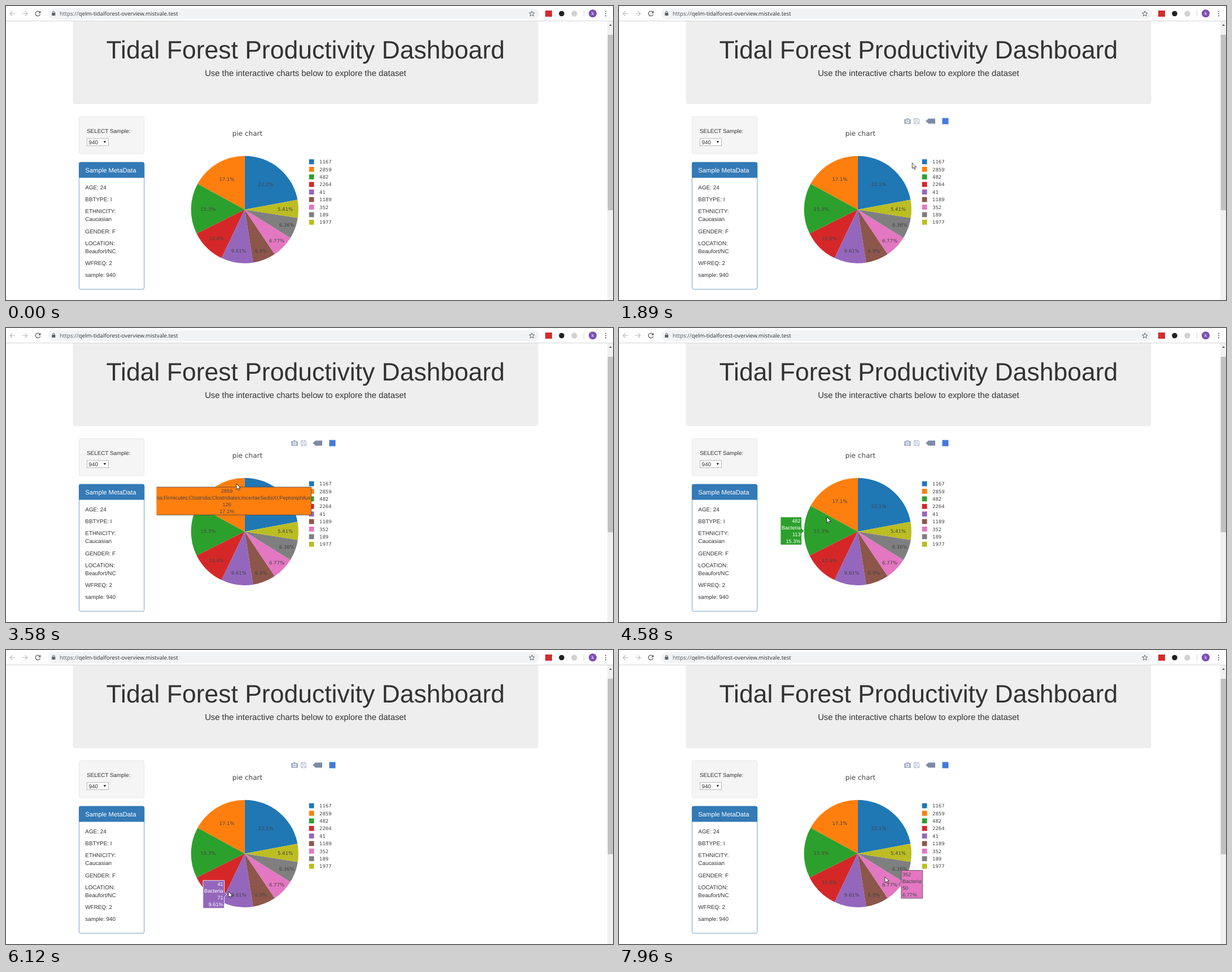
Recreate the animation shown at these times as an HTML page. Size 1075 by 521 pixels, loop 8000 ms.

```html
<!DOCTYPE html>
<html lang="en">
<head>
<meta charset="utf-8">
<title>Dashboard</title>
<style>
html, body { margin: 0; width: 100%; height: 100%; overflow: hidden; background: #fff; }
svg { display: block; width: 100%; height: 100%; }
text { font-family: "Liberation Sans", Arial, sans-serif; text-rendering: geometricPrecision; white-space: pre; }
.plot text { font-family: "DejaVu Sans", Verdana, sans-serif; font-size: 8.5px; fill: #444; }
.plot .title { font-size: 12px; }
#tip text { font-family: "Liberation Sans", Arial, sans-serif; font-size: 9.17px; }
.body text { font-size: 9.88px; fill: #333; }
.mid { text-anchor: middle; }
.end { text-anchor: end; }
</style>
</head>
<body>
<svg viewBox="0 0 1075 521" xmlns="http://www.w3.org/2000/svg">
  <defs><clipPath id="area"><rect x="266.5" y="190" width="322.5" height="320"/></clipPath></defs>
  <rect width="1075" height="521" fill="#fff"/>

  <!-- page header -->
  <rect x="118.4" y="10" width="824.1" height="164" rx="4.2" fill="#eee"/>
  <text class="mid" x="530.4" y="93.2" font-size="44.5" fill="#333">Tidal Forest Productivity Dashboard</text>
  <text class="mid" x="530.4" y="124.1" font-size="14.82" fill="#333">Use the interactive charts below to explore the dataset</text>

  <!-- browser bar -->
  <rect width="1075" height="26" fill="#fff"/>
  <path d="M0 26.5H1075" stroke="#d6d6d6"/>
  <rect x="75" y="4" width="869" height="19" rx="9.5" fill="#f1f3f4"/>
  <g fill="none" stroke="#b9bbbe" stroke-width="1.2">
    <path d="M16 13.5H7.4M11.4 9.3L7.2 13.5L11.4 17.7"/>
    <path d="M29 13.5H37.6M33.6 9.3L37.8 13.5L33.6 17.7"/>
    <path d="M59.8 10.6A4.3 4.3 0 1 0 60.6 14.6" stroke="#55585c"/>
  </g>
  <path d="M61.3 8.6V12.7H57.2Z" fill="#55585c"/>
  <rect x="81.3" y="12" width="6" height="5" rx=".6" fill="#5f6368"/>
  <path d="M82.6 12.2V11A1.7 1.7 0 0 1 86 11V12.2" fill="none" stroke="#5f6368"/>
  <text x="95" y="17" font-size="9.8" fill="#55595e" style="font-family:'Open Sans',sans-serif">https://<tspan fill="#2b2d30">qelm-tidalforest-overview.mistvale.test</tspan></text>
  <path id="star" fill="none" stroke="#5f6368"/>
  <rect x="955" y="8" width="12" height="11" fill="#d32d2f"/>
  <circle cx="984" cy="13.5" r="4.8" fill="#222"/>
  <circle cx="1006.5" cy="13.5" r="5.2" fill="#d2d2d2"/>
  <path d="M1023.5 8V19" stroke="#d5d7da"/>
  <circle cx="1039" cy="13.3" r="7" fill="#7b4fb5"/>
  <text class="mid" x="1039" y="16.2" font-size="8.5" fill="#fff">k</text>
  <g fill="#5f6368"><circle cx="1062" cy="9.6" r="1.1"/><circle cx="1062" cy="13.5" r="1.1"/><circle cx="1062" cy="17.4" r="1.1"/></g>

  <!-- scrollbar -->
  <rect x="1065" y="27" width="10" height="494" fill="#f1f1f1"/>
  <path d="M1068 35H1073L1070.5 32.3Z" fill="#505050"/>
  <rect x="1065.7" y="51" width="9.3" height="311" fill="#c1c1c1"/>

  <!-- side column -->
  <g class="body">
    <rect x="129.4" y="196" width="115.4" height="66" rx="3" fill="#f5f5f5" stroke="#e3e3e3" stroke-width=".7"/>
    <text x="143" y="224.5">SELECT Sample:</text>
    <rect x="143.5" y="234.8" width="38" height="12.8" fill="#fff" stroke="#a9a9a9" stroke-width=".8"/>
    <text x="146.5" y="244.5">940</text>
    <path d="M172.7 239.2H177.1L174.9 243Z" fill="#222"/>
    <rect x="129.4" y="277" width="115.4" height="225" rx="3" fill="#fff" stroke="#337ab7" stroke-width=".7"/>
    <path d="M129 304.5V280A3 3 0 0 1 132 276.7H242A3 3 0 0 1 245.1 280V304.5Z" fill="#337ab7"/>
    <text x="140.3" y="294.6" style="font-size:11.28px;fill:#fff">Sample MetaData</text>
    <g id="meta"></g>
  </g>

  <!-- chart -->
  <g class="plot">
    <text class="title mid" x="427.5" y="230.2">pie chart</text>
    <g id="pie"></g>
    <g id="legend"></g>
    <g id="bar" opacity="0">
      <path fill="#a9b4c9" fill-rule="evenodd" d="M506 200.5H508.5L509.3 199H512.8L513.6 200.5H516A1 1 0 0 1 517 201.5V208A1 1 0 0 1 516 209H506A1 1 0 0 1 505 208V201.5A1 1 0 0 1 506 200.5ZM511 201.7A2.9 2.9 0 1 0 511 207.5A2.9 2.9 0 1 0 511 201.7Z"/>
      <circle cx="511" cy="204.6" r="1.7" fill="#a9b4c9"/>
      <path fill="none" stroke="#a9b4c9" d="M522.5 199.3H530L531.7 201V208.7H522.5ZM524.5 199.3V202.5H529V199.3M524.5 208.7V205.2H529.8V208.7"/>
      <path fill="#7d8ba7" d="M543.3 204L548 199.5H560V208.5H548Z"/>
      <rect x="572.5" y="198.5" width="11" height="11" fill="#447adb"/>
    </g>
    <g id="tip" clip-path="url(#area)"></g>
  </g>

  <g id="cursor" fill="#fff" stroke="#111" stroke-width=".8" stroke-linejoin="round">
    <path id="arrow" d="M0 0V10.2L2.4 8L4 11.7L5.7 11L4.1 7.4H7.3Z"/>
    <path id="hand" d="M-1 1A1 1 0 0 1 1 1V5L2.6 5.2L4.3 5.6L6 6.3V9.5L5 13H-1.5L-4.2 8.8A1 1 0 0 1 -2.6 7.6L-1 9Z"/>
  </g>
</svg>
<script>
const $ = id => document.getElementById(id);
const LOOP = 8000, CX = 422.8, CY = 360.8, R = 95.1;

const porph = "Bacteria;Bacteroidetes;Bacteroidia;Bacteroidales;Porphyromonadaceae;Porphyromonas";
const clost = "Bacteria;Firmicutes;Clostridia;Clostridiales;IncertaeSedisXI";

// id, count, colour, label x/y, hover: side, x, y, width, taxon, dark text
const slices = [
  { id: 1167, n: 163, c: "#1f77b4", x: 460, y: 316.3, tip: ["mid", 460, 316.6, 362.8, porph] },
  { id: 2859, n: 126, c: "#ff7f0e", x: 391, y: 307, tip: ["mid", 391.2, 306.6, 299, clost + ";Peptoniphilus", 1] },
  { id: 482, n: 113, c: "#2ca02c", x: 358, y: 359.5, tip: ["end", 327.8, 359.6, 37.5, "Bacteria"] },
  { id: 2264, n: 78, c: "#d62728", x: 372.7, y: 412, tip: ["mid", 373, 412.3, 243, clost] },
  { id: 41, n: 71, c: "#9467bd", x: 412.3, y: 433.5, tip: ["end", 391, 433, 37.8, "Bacteria"] },
  { id: 1189, n: 51, c: "#8c564b", x: 451.5, y: 434, tip: ["mid", 451.5, 433.7, 362.8, porph] },
  { id: 352, n: 50, c: "#e377c2", x: 479.5, y: 415.5, tip: ["start", 495.6, 415.3, 37.8, "Bacteria", 1] },
  { id: 189, n: 47, c: "#7f7f7f", x: 497.2, y: 388 },
  { id: 1977, n: 40, c: "#bcbd22", x: 494.5, y: 360 }
];
const total = slices.reduce((s, d) => s + d.n, 0);
const pct = d => +(d.n / total * 100).toPrecision(3) + "%";
const rim = turn => {
  const a = turn * 2 * Math.PI;
  return `${CX + R * Math.sin(a)} ${CY - R * Math.cos(a)}`;
};

// The first slice runs clockwise from the top, the others follow anticlockwise
let edge = 1;
slices.forEach((d, i) => {
  const share = d.n / total;
  d.to = i ? edge : share;
  d.from = d.to - share;
  if (i) edge = d.from;
});

$("pie").innerHTML = slices.map(d =>
  `<path d="M${CX} ${CY}L${rim(d.from)}A${R} ${R} 0 0 1 ${rim(d.to)}Z" fill="${d.c}"/>`).join("") +
  slices.map(d => `<text class="mid" x="${d.x}" y="${d.y + 3.1}">${pct(d)}</text>`).join("");

$("legend").innerHTML = slices.map((d, i) => {
  const y = 276 + 13.4 * i;
  return `<rect x="536.7" y="${y - 4.4}" width="8.8" height="8.8" fill="${d.c}"/>
    <text x="555" y="${y + 3.2}">${d.id}</text>`;
}).join("");

const meta = [[325, "AGE: 24"], [346.2, "BBTYPE: I"], [367.3, "ETHNICITY:"], [381.4, "Caucasian"],
  [402.5, "GENDER: F"], [423.6, "LOCATION:"], [437.6, "Beaufort/NC"], [458.7, "WFREQ: 2"], [479.8, "sample: 940"]];
$("meta").innerHTML = meta.map(([y, s]) => `<text x="140.3" y="${y}">${s}</text>`).join("");

$("star").setAttribute("d", "M" + Array.from({ length: 10 }, (_, i) => {
  const a = i * Math.PI / 5, r = i % 2 ? 2.2 : 5;
  return `${931.3 + r * Math.sin(a)} ${13.8 - r * Math.cos(a)}`;
}).join("L") + "Z");

function tipMarkup(d) {
  const [side, x, y, w, taxon, dark] = d.tip;
  const ink = dark ? "#444" : "#fff", h = 24.7, a = 4.3;
  const dir = side === "end" ? -1 : 1;
  const box = side === "mid"
    ? `M${x - w / 2} ${y - h}h${w}v${2 * h}h${-w}Z`
    : `M${x} ${y}l${dir * a} ${-a}V${y - h}h${dir * w}v${2 * h}h${-dir * w}V${y + a}Z`;
  const tx = side === "mid" ? x : x + dir * (a + 2);
  return `<path d="${box}" fill="${d.c}" stroke="${ink}" stroke-width=".8"/>` +
    [d.id, taxon, d.n, pct(d)].map((s, i) =>
      `<text class="${side}" x="${tx}" y="${y - 14.7 + 12 * i}" style="fill:${ink}">${s}</text>`).join("");
}

// Pointer moves: start, end, steps, target x, target y
const moves = [
  [120, 420, 5, 641, 366], [650, 965, 5, 562, 284], [1044, 1280, 4, 531, 263],
  [1510, 1740, 4, 523, 274], [1890, 2427, 8, 493, 305], [2504, 2580, 2, 492, 306],
  [3040, 3578, 8, 408, 276], [4350, 4578, 4, 368, 335], [4657, 5120, 7, 362, 374],
  [5200, 5430, 4, 370, 406], [5890, 6118, 4, 394, 428], [6197, 6430, 4, 403, 439],
  [6960, 7730, 11, 456, 429], [7810, 7958, 3, 471, 402]
];

function pointer(t) {
  let x = 960, y = 535;
  for (const [t0, t1, n, tx, ty] of moves) {
    if (t < t0) break;
    const k = Math.min(1, (Math.floor((t - t0) / (t1 - t0) * (n - 1)) + 1) / n);
    x += (tx - x) * k;
    y += (ty - y) * k;
  }
  return [x, y];
}

function sliceAt(x, y) {
  const dx = x - CX, dy = y - CY;
  if (Math.hypot(dx, dy) > R) return null;
  const turn = (Math.atan2(dx, -dy) / (2 * Math.PI) + 1) % 1;
  return slices.find(d => turn >= d.from && turn < d.to);
}

let shown = null;
function draw(t) {
  const [x, y] = pointer(t);
  const onLegend = x > 534 && x < 587 && y > 270 && y < 389;
  $("cursor").setAttribute("transform", `translate(${x} ${y})`);
  $("cursor").setAttribute("visibility", t < 120 ? "hidden" : "visible");
  $("arrow").setAttribute("display", onLegend ? "none" : "inline");
  $("hand").setAttribute("display", onLegend ? "inline" : "none");
  $("bar").setAttribute("opacity", Math.max(0, Math.min(1, (t - 962) / 300)));
  const hit = sliceAt(x, y);
  if (hit !== shown) {
    shown = hit;
    $("tip").innerHTML = hit && hit.tip ? tipMarkup(hit) : "";
  }
}

const begin = performance.now();
function tick() {
  draw((performance.now() - begin) % LOOP);
  requestAnimationFrame(tick);
}
tick();
</script>
</body>
</html>
```
